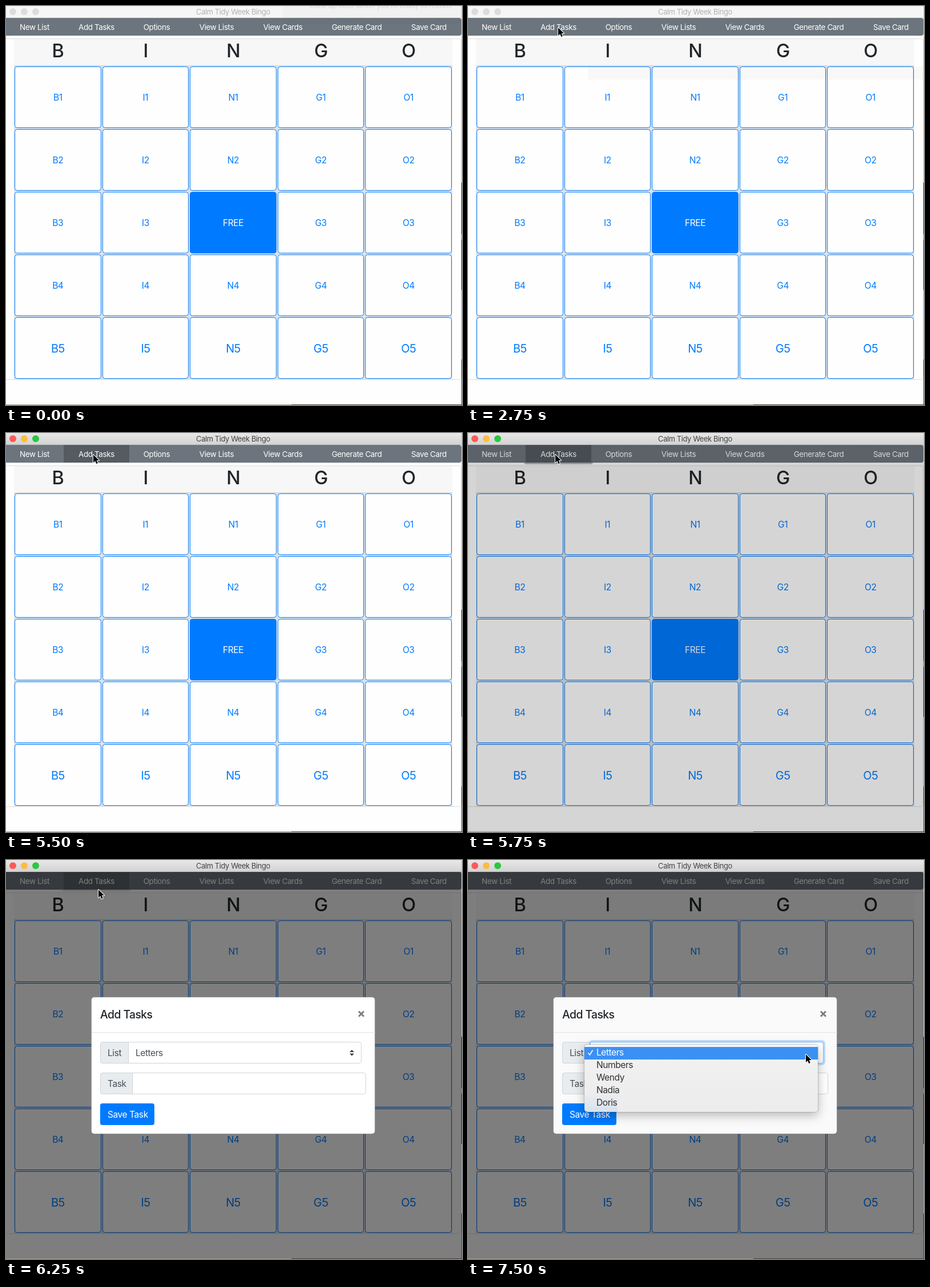
Recreate the animation shown at these times as an HTML page with a canvas. Size 799 px wide and 700 px high, loop 8 s.

```html
<!DOCTYPE html>
<html lang="en">
<head>
<meta charset="utf-8">
<title>Bingo card</title>
<style>
html, body { margin: 0; width: 100%; height: 100%; overflow: hidden; background: #fff; }
canvas { display: block; }
</style>
</head>
<body>
<canvas id="stage" width="799" height="700"></canvas>
<script>
const ctx = document.getElementById('stage').getContext('2d');
const LOOP = 8000;
const BLUE = '#007bff';
const INK = '#212529';
const COLUMNS = [...'BINGO'];
const NAV = [['New List', 50], ['Add Tasks', 158.5], ['Options', 264], ['View Lists', 369],
  ['View Cards', 485], ['Generate Card', 614.5], ['Save Card', 741]];
const CHOICES = ['Letters', 'Numbers', 'Wendy', 'Nadia', 'Doris'];

// Pointer tip: [start time, x, y]
const POINTER = [
  [500, 198, 110], [750, 180, 105], [1000, 157, 87], [1250, 157, 70], [1500, 158, 46],
  [1750, 158, 43], [2500, 158, 39], [2750, 158, 38], [5500, 153, 38], [6250, 162, 52],
  [6500, 491, 318], [6750, 531, 326], [7000, 573, 341], [7250, 592, 341]
];

function rect(x, y, w, h, fill) {
  ctx.fillStyle = fill;
  ctx.fillRect(x, y, w, h);
}

function box(x, y, w, h, radius, fill, stroke) {
  ctx.beginPath();
  ctx.roundRect(x, y, w, h, radius);
  if (fill) { ctx.fillStyle = fill; ctx.fill(); }
  if (stroke) { ctx.strokeStyle = stroke; ctx.lineWidth = 1; ctx.stroke(); }
}

function polygon(points, fill) {
  ctx.beginPath();
  points.forEach(([x, y]) => ctx.lineTo(x, y));
  ctx.closePath();
  ctx.fillStyle = fill;
  ctx.fill();
}

function line(points, width, color) {
  ctx.beginPath();
  points.forEach(([x, y], i) => i ? ctx.lineTo(x, y) : ctx.moveTo(x, y));
  ctx.lineWidth = width;
  ctx.strokeStyle = color;
  ctx.stroke();
}

function text(str, x, y, size, color, align = 'left', weight = 400) {
  ctx.font = `${weight} ${size}px Inter, "Noto Sans", sans-serif`;
  ctx.letterSpacing = `${-0.03 * size}px`;
  ctx.textAlign = align;
  ctx.fillStyle = color;
  ctx.fillText(str, x, y);
}

function drawDesktopEdge() {
  rect(798, 0, 1, 310, '#c3d3dc');
  rect(798, 310, 1, 188, '#3b3a3c');
  rect(798, 400, 1, 10, '#b98a50');
  rect(798, 498, 1, 122, '#dcae68');
  rect(798, 620, 1, 80, '#5b4a3a');
  rect(0, 699, 500, 1, '#a79a86');
  rect(500, 699, 299, 1, '#4a3a30');
}

function drawTitleBar(active) {
  const shade = ctx.createLinearGradient(0, 0, 0, 21);
  shade.addColorStop(0, active ? '#e8e8e8' : '#f6f6f6');
  shade.addColorStop(1, active ? '#d2d2d2' : '#f6f6f6');
  rect(0, 0, 798, 21, shade);
  rect(0, 20, 798, 1, active ? '#bdbdbd' : '#dedede');
  const lights = active ? ['#fc5b57', '#fdbc40', '#28c840'] : ['#dcdcdc', '#dcdcdc', '#dcdcdc'];
  lights.forEach((color, i) => box(6 + 20 * i, 4, 12, 12, 6, color));
  text('Calm Tidy Week Bingo', 398, 15, 12.9, active ? '#434343' : '#b2b2b2', 'center');
}

function drawNav(t) {
  box(0, 21, 798, 31, [0, 4, 4, 0], '#6c757d');
  if (t >= 5000 && t < 5250) rect(0, 21, 102, 31, '#5f676e');
  if (t >= 5500 && t < 6500) {
    const ring = t < 5750 ? 0 : t < 6250 ? 0.5 : 0.2;
    box(98, 21, 121, 34, [0, 0, 4, 4], `rgba(108,117,125,${ring})`);
    rect(101, 21, 115, 31, t < 6250 ? '#545b62' : '#5a6268');
  }
  NAV.forEach(([label, x]) => text(label, x, 42, 13.5, '#fff', 'center'));
}

function drawCard(t) {
  box(-10, 57.5, 807.5, 598, 4, null, '#dfdfdf');
  rect(14, 58, 768, 46, '#f7f7f7');
  rect(14, 104, 768, 551, '#e1e2e3');
  rect(14, 104, 768, 1, '#d4d6d8');
  COLUMNS.forEach((letter, col) => {
    const left = Math.round(15 + 153.6 * col);
    const right = Math.round(166.6 + 153.6 * col);
    const middle = 90.8 + 153.6 * col;
    text(letter, middle, 89.5, 32.5, INK, 'center', 500);
    for (let row = 0; row < 5; row++) {
      const top = 106 + 110 * row;
      const free = col === 2 && row === 2;
      box(left + 0.5, top + 0.5, right - left - 1, 107, 4, free ? BLUE : '#fefefe', BLUE);
      const big = row === 4;
      text(free ? 'FREE' : letter + (row + 1), middle, top + (big ? 61.5 : 60),
        big ? 20 : 15.6, free ? '#fff' : BLUE, 'center');
    }
  });
  if (t >= 500 && t < 5000) rect(210, 106, 587, 23, 'rgba(0,0,0,0.022)');
}

function drawRecordHint(t) {
  if (t >= 500) return;
  rect(485, 0, 313, 32, 'rgba(0,0,0,0.02)');
  if (t < 250) text("Click up here when you're ready to record", 532, 4, 13.3, '#dadada');
}

function drawField(y, label, split, right) {
  box(165.5, y + 0.5, right - 166, 37, 4, '#fff', '#ced4da');
  box(165.5, y + 0.5, split - 165, 37, [4, 0, 0, 4], '#e9ecef', '#ced4da');
  text(label, 178, y + 25, 15.6, '#495057');
}

function drawModal(t) {
  const fading = t < 6250;
  ctx.save();
  if (fading) {
    ctx.globalAlpha = 0.78;
    ctx.translate(0, -22);
  }
  box(149.5, 240.5, 497, 240, 5, t < 7500 ? '#fff' : '#fafafa', 'rgba(0,0,0,0.2)');
  text('Add Tasks', 165, 278, 19.4, INK, 'left', 500);
  line([[618, 265.5], [627, 274.5]], 3, '#7d7d7d');
  line([[627, 265.5], [618, 274.5]], 3, '#7d7d7d');
  rect(150, 302, 497, 1, '#dee2e6');
  drawField(319, 'List', 214, 623);
  text('Letters', 227, 344, 15.6, '#495057');
  polygon([[602, 337], [606, 333], [610, 337]], '#343a40');
  polygon([[602, 339.5], [606, 343.5], [610, 339.5]], '#343a40');
  drawField(373, 'Task', 221, 631);
  box(165, 427, 95, 38, 4, BLUE);
  text('Save Task', 178, 452, 15.6, '#fff');
  ctx.restore();
}

function drawDropdown() {
  box(212, 316, 414, 44, 6, 'rgba(0,123,255,0.25)');
  box(214.5, 319.5, 408, 37, [0, 4, 4, 0], '#fff', '#80bdff');

  ctx.save();
  ctx.shadowColor = 'rgba(0,0,0,0.28)';
  ctx.shadowBlur = 18;
  ctx.shadowOffsetY = 6;
  const shade = ctx.createLinearGradient(0, 324, 0, 442);
  shade.addColorStop(0, '#f4f4f4');
  shade.addColorStop(0.3, '#f0f0f0');
  shade.addColorStop(1, '#ececec');
  box(204, 324, 409, 118, 5, shade);
  ctx.restore();
  box(203.5, 323.5, 410, 119, 5, null, 'rgba(0,0,0,0.14)');

  const tint = ctx.createLinearGradient(0, 408, 0, 442);
  tint.addColorStop(0, 'rgba(0,123,255,0)');
  tint.addColorStop(1, 'rgba(0,123,255,0.09)');
  box(204, 408, 58, 34, [0, 0, 0, 5], tint);

  rect(204, 328, 409, 22, '#3b90f4');
  line([[210.5, 338.5], [213.5, 342], [218.5, 333.5]], 1.6, '#fff');
  CHOICES.forEach((name, i) => text(name, 225, 343 + 22 * i, 15.6, i ? '#303030' : '#fff'));
}

function drawPointer(t) {
  const stop = POINTER.filter(([start]) => start <= t).pop();
  if (!stop) return;
  ctx.save();
  ctx.translate(stop[1], stop[2]);
  ctx.beginPath();
  [[0, 0], [0, 14], [3.2, 11], [5.4, 16], [7.8, 15], [5.7, 10.1], [10, 10]]
    .forEach(([x, y]) => ctx.lineTo(x, y));
  ctx.closePath();
  ctx.lineJoin = 'round';
  ctx.lineWidth = 2;
  ctx.strokeStyle = '#fff';
  ctx.stroke();
  ctx.fillStyle = '#000';
  ctx.fill();
  ctx.restore();
}

function draw(t) {
  rect(0, 0, 799, 700, '#fefefe');
  drawTitleBar(t >= 5000);
  drawNav(t);
  drawCard(t);
  drawRecordHint(t);
  if (t >= 5750) rect(0, 21, 798, 678, `rgba(0,0,0,${t < 6000 ? 0.16 : 0.5})`);
  drawDesktopEdge();
  if (t >= 6000) drawModal(t);
  if (t >= 7250) drawDropdown();
  drawPointer(t);
}

function tick() {
  draw(performance.now() % LOOP);
  requestAnimationFrame(tick);
}
tick();
</script>
</body>
</html>
```
